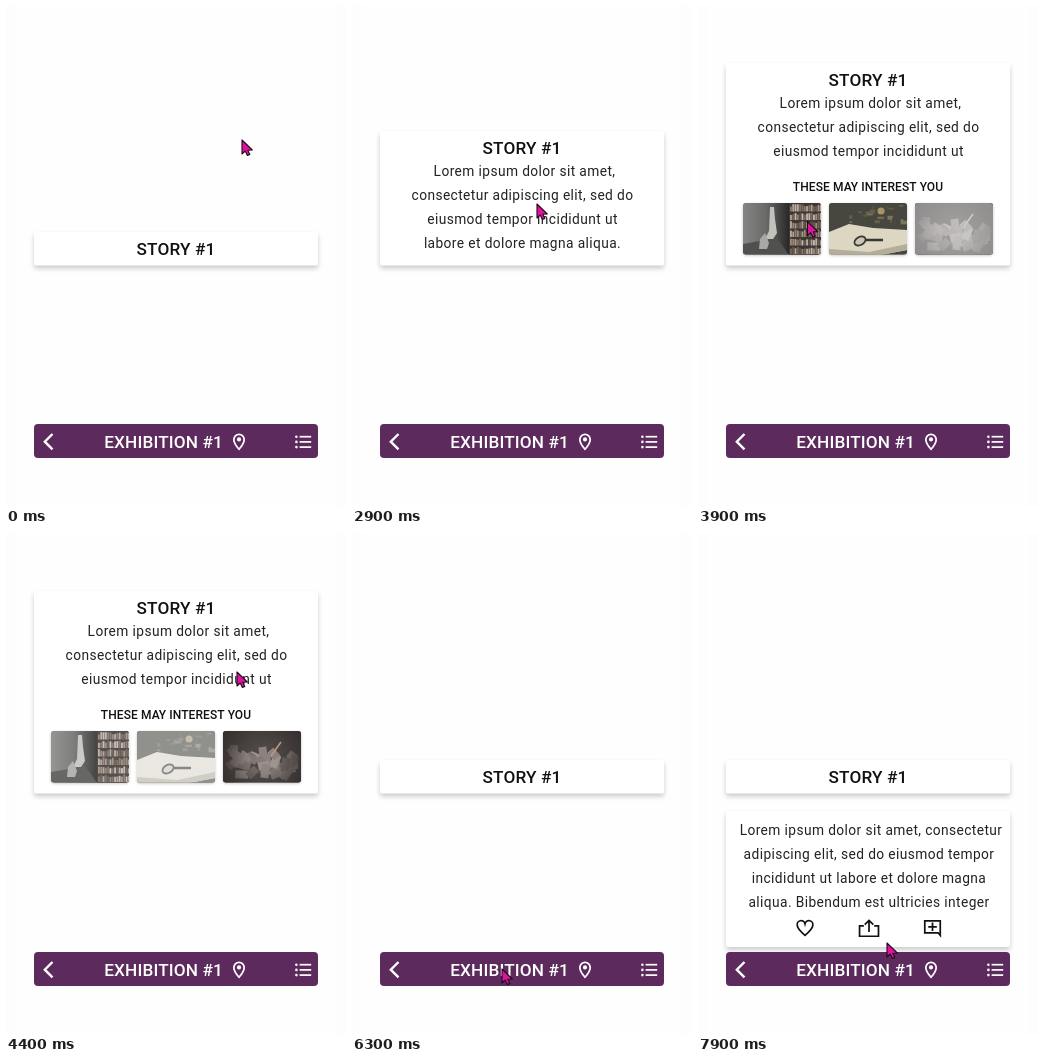
An HTML page with a canvas for the animation above (8000 ms loop, 340 by 500 pixels).

```html
<!DOCTYPE html>
<html lang="en">
<head>
<meta charset="utf-8">
<title>Expanding story cards</title>
<style>
  html, body { margin: 0; width: 100%; height: 100%; overflow: hidden; background: #fefefe; }
  canvas { display: block; }
</style>
</head>
<body>
<canvas id="stage" width="340" height="500"></canvas>
<script>
const ctx = document.getElementById('stage').getContext('2d');
const LOOP = 8000, STEP = 100;
const LEFT = 28, WIDTH = 284, STORY_BOTTOM = 259.5, PANEL_BOTTOM = 413;
const PHOTO_W = 78, PHOTO_H = 51.5;

function ease(t, start, end) {
  const p = Math.min(1, Math.max(0, (t - start) / (end - start)));
  return p * p * (3 - 2 * p);
}

const lerp = (a, b, p) => a + (b - a) * p;

function seeded(seed) {
  return () => (seed = (seed * 16807) % 2147483647) / 2147483647;
}

function rect(x, y, w, h, color) {
  ctx.fillStyle = color;
  ctx.fillRect(x, y, w, h);
}

function rounded(x, y, w, h, r, color) {
  ctx.beginPath();
  ctx.roundRect(x, y, w, h, r);
  ctx.fillStyle = color;
  ctx.fill();
}

function dot(x, y, r, color) {
  ctx.beginPath();
  ctx.arc(x, y, r, 0, 7);
  ctx.fillStyle = color;
  ctx.fill();
}

function shape(path, color) {
  ctx.fillStyle = color;
  ctx.fill(new Path2D(path));
}

function stroke(path, width, color) {
  ctx.lineWidth = width;
  ctx.strokeStyle = color;
  ctx.stroke(new Path2D(path));
}

function scoped(draw) {
  ctx.save();
  draw();
  ctx.restore();
}

function label(text, x, y, size, weight, spacing, color = '#111') {
  ctx.font = `${weight} ${size}px Roboto, sans-serif`;
  ctx.letterSpacing = spacing + 'px';
  ctx.textAlign = 'center';
  ctx.fillStyle = color;
  ctx.fillText(text, x, y);
}

const heading = (text, x, y, color) => label(text, x, y + 6.2, 17.2, 500, 0.13, color);

function paragraph(lines, x, y) {
  lines.forEach((line, i) =>
    label(line, x + (i ? 0 : 2), y + 5 + i * 24, 13.76, 400, 0.4, '#222'));
}

// Icons use a 24 unit grid.
function icon(x, y, path, color) {
  scoped(() => {
    ctx.translate(x - 10.3, y - 10.3);
    ctx.scale(0.86, 0.86);
    stroke(path, 2, color);
  });
}

function card(top, bottom, drawContent) {
  scoped(() => {
    ctx.shadowColor = 'rgba(0,0,0,.2)';
    ctx.shadowBlur = 5;
    ctx.shadowOffsetY = 3;
    rounded(LEFT, top, WIDTH, bottom - top, 2, '#fff');
  });
  scoped(() => {
    ctx.beginPath();
    ctx.rect(LEFT, top, WIDTH, bottom - top);
    ctx.clip();
    drawContent();
  });
}

function library() {
  const rnd = seeded(41);
  const wall = ctx.createLinearGradient(0, 0, 46, 0);
  wall.addColorStop(0, '#858584');
  wall.addColorStop(0.5, '#6a6a69');
  wall.addColorStop(1, '#282827');
  rect(0, 0, PHOTO_W, 52, wall);
  shape('M0 41L34 35L46 52L0 52Z', '#50504e');
  shape('M27 4H31L32 16L34 30L30 36H22L26 28Z', '#c2c2bd');
  shape('M17 36L22 30L26 40L24 46H16Z', '#a9a9a4');
  rect(46, 0, 32, 52, '#3d3632');
  for (let y = 1; y < 52; y += 8.5) {
    for (let x = 47; x < 77; x += 2.3) {
      const h = 5 + rnd() * 2.5;
      rect(x, y + 7.5 - h, 1.9, h, `hsl(28 14% ${32 + rnd() * 42}%)`);
    }
  }
}

function openBook() {
  const rnd = seeded(7);
  rect(0, 0, PHOTO_W, 52, '#35342b');
  for (let i = 0; i < 24; i++) {
    rect(20 + rnd() * 56, rnd() * 20, 2 + rnd() * 5, 1 + rnd() * 3, `hsl(48 22% ${18 + rnd() * 20}%)`);
  }
  dot(52, 8, 3.5, '#a08a50');
  shape('M0 29L20 21L44 25L78 27V47L52 52H0Z', '#d9d2ba');
  shape('M0 46L40 49L78 41V47L52 52H0Z', '#aea58c');
  ctx.beginPath();
  ctx.ellipse(31, 38, 6, 4, -0.5, 0, 7);
  ctx.fillStyle = '#c4c0ad';
  ctx.fill();
  ctx.lineWidth = 1.8;
  ctx.strokeStyle = '#24231f';
  ctx.stroke();
  stroke('M37 37L54 37', 2.6, '#24231f');
}

function papers() {
  const rnd = seeded(93);
  rect(0, 0, PHOTO_W, 52, '#4d4746');
  for (let i = 0; i < 34; i++) {
    scoped(() => {
      ctx.translate(10 + rnd() * 62, 14 + rnd() * 32);
      ctx.rotate(rnd() * 3);
      rect(-6, -4, 9 + rnd() * 6, 8, `hsl(18 6% ${38 + rnd() * 22}%)`);
    });
  }
  const shade = ctx.createRadialGradient(40, 28, 14, 40, 28, 46);
  shade.addColorStop(0, 'rgba(50,44,43,0)');
  shade.addColorStop(1, 'rgba(50,44,43,.9)');
  rect(0, 0, PHOTO_W, 52, shade);
  stroke('M48 25L58 11', 1.6, '#b79a84');
}

// Resting photos are faded and partly desaturated.
function photo(draw, x, y, hover) {
  scoped(() => {
    ctx.shadowColor = 'rgba(0,0,0,.25)';
    ctx.shadowBlur = 3;
    ctx.shadowOffsetY = 1;
    rounded(x, y, PHOTO_W, PHOTO_H, 3, '#999');
    ctx.clip();
    ctx.shadowColor = 'transparent';
    ctx.translate(x, y);
    scoped(draw);
    ctx.globalAlpha = 0.45 * (1 - hover);
    ctx.globalCompositeOperation = 'saturation';
    rect(0, 0, PHOTO_W, 52, '#808080');
    ctx.globalCompositeOperation = 'source-over';
    rect(0, 0, PHOTO_W, 52, '#fff');
  });
}

const storyText = ['Lorem ipsum dolor sit amet,', 'consectetur adipiscing elit, sed do',
  'eiusmod tempor incididunt ut', 'labore et dolore magna aliqua.'];
const panelText = ['Lorem ipsum dolor sit amet, consectetur', 'adipiscing elit, sed do eiusmod tempor',
  'incididunt ut labore et dolore magna', 'aliqua. Bibendum est ultricies integer'];

// Photos in the order the pointer visits them, with their column.
const photos = [
  { draw: openBook, column: 1 },
  { draw: library, column: 0 },
  { draw: papers, column: 2 }
];

function hoverAmount(t, visit) {
  const start = 3100 + visit * 450;
  return ease(t, start, start + 300) * (1 - ease(t, start + 600, start + 1300));
}

function story(t) {
  const reading = ease(t, 2100, 2700);
  const related = ease(t, 2900, 3400);
  const closing = ease(t, 4700, 5300);
  const title = lerp(243 - 101 * reading - 68 * related, 243, closing);
  const textHeight = 108 - 24 * related;
  card(title - 17, STORY_BOTTOM, () => {
    heading('STORY #1', 170, title);
    scoped(() => {
      ctx.beginPath();
      ctx.rect(LEFT, title + 10, WIDTH, textHeight - 10);
      ctx.clip();
      paragraph(storyText, 170.5, title + 23);
    });
    const section = title + textHeight + 23;
    label('THESE MAY INTEREST YOU', 170, section + 4.4, 12, 500, 0.08);
    photos.forEach(({ draw, column }, visit) =>
      photo(draw, 45 + column * 86, section + 16, hoverAmount(t, visit)));
  });
}

function panel(t) {
  const height = 136 * ease(t, 6300, 7000);
  if (height < 1) return;
  const top = PANEL_BOTTOM - height;
  card(top, PANEL_BOTTOM, () => {
    paragraph(panelText, 171, top + 19);
    const y = top + 117.5;
    icon(107, y, 'M12 20C6 14.8 3 12 3 8.5A4.6 4.6 0 0 1 12 6.4A4.6 4.6 0 0 1 21 8.5C21 12 18 14.8 12 20Z', '#111');
    icon(171, y, 'M6 9H1V21H23V9H18M12 16V3M7 7.5L12 2.5L17 7.5', '#111');
    icon(234.5, y, 'M3 3H21V20L18.5 17H3ZM12 5V15M7 10H17', '#111');
  });
}

function bar() {
  rounded(LEFT, 418, WIDTH, 34, 4, '#5d2a5d');
  heading('EXHIBITION #1', 157.6, 436, '#fff');
  stroke('M46.5 428L38.8 435.7L46.5 443.4', 2.4, '#fff');
  icon(233, 436, 'M12 20.4C12 20.4 6 13.6 6 9A6 6 0 0 1 18 9C18 13.6 12 20.4 12 20.4Z', '#fff');
  dot(233, 433.4, 2.1, '#fff');
  for (let y = 430.7; y < 442; y += 5.2) {
    dot(290.4, y, 1.3, '#fff');
    rect(293.6, y - 0.85, 11.6, 1.7, '#fff');
  }
}

// Pointer moves: [start, end, x, y].
const moves = [
  [600, 800, 216, 235],
  [1100, 1200, 299, 188],
  [1200, 1800, 181, 236],
  [2100, 2700, 184, 197],
  [2900, 3400, 154, 197],
  [3400, 3800, 85, 215],
  [3800, 4200, 235, 213],
  [4200, 4400, 230, 137],
  [4400, 4700, 192, 72],
  [4900, 5600, 149, 434],
  [7100, 7500, 200, 402],
  [7600, 7900, 188, 408]
];

function cursor(t) {
  let x = 235, y = 133;
  for (const [start, end, toX, toY] of moves) {
    const p = ease(t, start, end);
    x = lerp(x, toX, p);
    y = lerp(y, toY, p);
  }
  scoped(() => {
    const arrow = 'M0 0V14L3.2 11L5.4 15.5L7.8 14.4L5.8 10.2L10.3 10Z';
    ctx.translate(x + 1, y + 1);
    ctx.lineJoin = 'round';
    shape(arrow, '#e012a0');
    stroke(arrow, 1.1, '#1c0a18');
  });
}

function render(now) {
  const t = Math.floor((now % LOOP) / STEP) * STEP;
  rect(0, 0, 340, 500, '#fdfdfd');
  rect(10, 0, 320, 500, '#fefefe');
  story(t);
  panel(t);
  bar();
  cursor(t);
}

const start = performance.now();
function tick() {
  render(performance.now() - start);
  requestAnimationFrame(tick);
}
tick();
</script>
</body>
</html>
```
